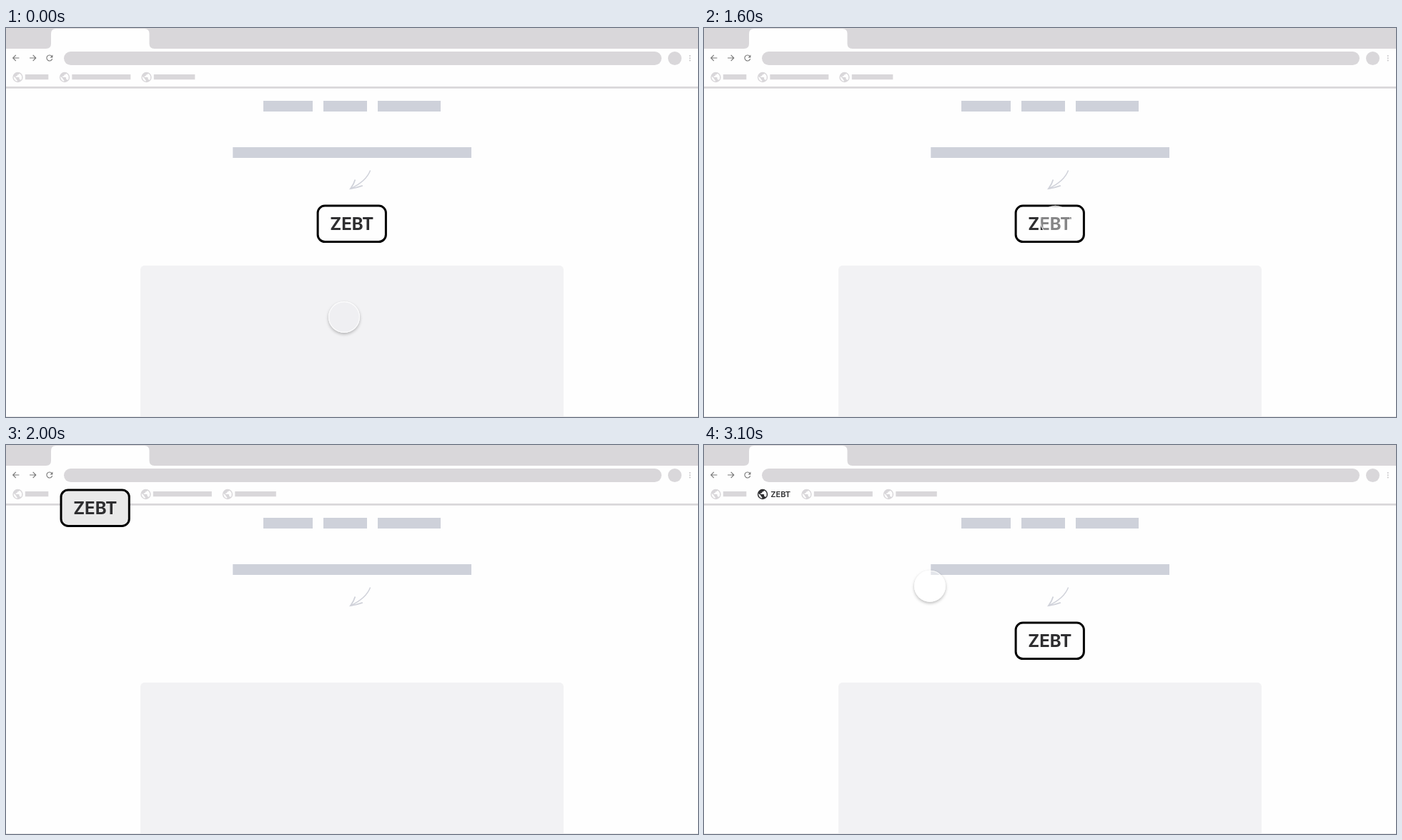
An HTML page with a canvas for the animation above (4.5 s loop, 968x545 px).

```html
<!DOCTYPE html>
<html lang="en">
<head>
<meta charset="utf-8">
<title>Drag to bookmarks</title>
<style>
html, body { margin: 0; width: 100%; height: 100%; overflow: hidden; background: #fefefe; }
canvas { display: block; width: 968px; height: 545px; }
</style>
</head>
<body>
<canvas id="stage" width="968" height="545"></canvas>
<script>
const ctx = document.getElementById('stage').getContext('2d');
const W = 968, H = 545, LOOP = 4500, STEP = 100, LABEL = 'ZEBT';
const PAPER = '#fefefe', CHROME = '#d9d7da', BLOCK = '#ced1da', PANEL = '#f2f2f4';
const INK = '#2e2e30', ICON = '#777', SKETCH = '#d0d2da';
const FONT = 'Inter, Roboto, sans-serif';
const HOME = { x: 436.1, y: 249.1 }, DROP = { x: 77, y: 63 };
const GAP_WIDE = 113.5, GAP_SAVED = 61.5;

// Disc with two land masses cut out, on a 24 unit grid
const globePath = new Path2D('M2 12A10 10 0 1 0 22 12A10 10 0 1 0 2 12Z' +
  'M11 19.9A8 8 0 0 1 4.2 10.2L9 15V16L11 18Z' +
  'M15 4.6A8 8 0 0 1 17.9 17.4L16 16H15V13L14 12H8V10H10L11 9V7H13L15 5Z');

const mix = (a, b, p) => a + (b - a) * p;
const between = (a, b, p) => ({ x: mix(a.x, b.x, p), y: mix(a.y, b.y, p) });
const span = (t, from, to) => Math.min(1, Math.max(0, (t - from) / (to - from)));
const easeIn = (p, power = 2) => p ** power;
const easeOut = p => 1 - (1 - p) ** 2;

function faded(alpha, draw, blend = 'source-over') {
  if (alpha <= 0) return;
  ctx.save();
  ctx.globalAlpha = alpha;
  ctx.globalCompositeOperation = blend;
  draw();
  ctx.restore();
}

function box(x, y, w, h, color, r = 0) {
  ctx.fillStyle = color;
  ctx.beginPath();
  ctx.roundRect(x, y, w, h, r);
  ctx.fill();
}

function dot(x, y, r, color) {
  ctx.fillStyle = color;
  ctx.beginPath();
  ctx.arc(x, y, r, 0, Math.PI * 2);
  ctx.fill();
}

function stroke(path, color, width) {
  ctx.strokeStyle = color;
  ctx.lineWidth = width;
  ctx.stroke(new Path2D(path));
}

function text(x, y, size, weight, align) {
  ctx.font = `${weight} ${size}px ${FONT}`;
  ctx.textAlign = align;
  ctx.fillStyle = INK;
  ctx.fillText(LABEL, x, y);
}

function globe(x, color) {
  ctx.save();
  ctx.translate(x, 69);
  ctx.scale(.72, .72);
  ctx.translate(-12, -12);
  ctx.fillStyle = color;
  ctx.fill(globePath, 'evenodd');
  ctx.restore();
}

function bookmark(x, width) {
  globe(x, CHROME);
  box(x + 10.3, 65, width, 7.3, CHROME);
}

function movingBookmarks(shift) {
  bookmark(82 + shift, 82);
  bookmark(196.5 + shift, 57.5);
}

function navArrow(x, dir) {
  ctx.save();
  ctx.translate(x, 42);
  ctx.scale(dir, 1);
  stroke('M-4.4 0H4.2M.2 -4.2L4.3 0L.2 4.2', ICON, 1.1);
  ctx.restore();
}

function reload() {
  stroke('M64 39.4A4 4 0 1 0 64.7 43.3', ICON, 1.1);
  ctx.fillStyle = ICON;
  ctx.fill(new Path2D('M65.4 37.6V41.4H61.6Z'));
}

function browser() {
  box(0, 0, W, 29, CHROME);
  ctx.fillStyle = PAPER;
  ctx.fill(new Path2D('M56 29Q63 29 63 22V8Q63 1 70 1H193.5Q200.5 1 200.5 8V22Q200.5 29 207.5 29Z'));
  navArrow(14, -1);
  navArrow(37.5, 1);
  reload();
  box(81, 33, 836, 19, CHROME, 9.5);
  dot(935.5, 42.5, 9.5, CHROME);
  for (let i = -1; i <= 1; i++) dot(956.7, 42.3 + i * 3.3, 1, '#c8c6c9');
  bookmark(16.5, 32.5);
  box(0, 82, W, 2.8, CHROME);
}

function page() {
  box(360, 102, 69, 15, BLOCK);
  box(444, 102, 61, 15, BLOCK);
  box(520, 102, 88, 15, BLOCK);
  box(317.3, 167, 333.7, 15, BLOCK);
  stroke('M509.6 199.5Q504 214.5 482.5 224.8', SKETCH, 1.5);
  stroke('M488.4 212.5Q486.5 219 482 225Q490 224 498.8 220.8', SKETCH, 1.8);
  box(188, 332.7, 592, 212, PANEL, [6, 6, 0, 0]);
  box(0, 544, W, 1, '#e9e9eb');
}

function button({ x, y }, shade = 254) {
  box(x, y, 95.3, 50.4, `rgb(${shade},${shade},${shade})`, 10);
  ctx.strokeStyle = '#000';
  ctx.lineWidth = 3;
  ctx.stroke();
  text(x + 47.7, y + 34.3, 24, 700, 'center');
}

function cursorShadow(x, y, r) {
  ctx.save();
  ctx.beginPath();
  ctx.rect(0, 0, W, H);
  ctx.arc(x, y, r, 0, Math.PI * 2);
  ctx.clip('evenodd');
  ctx.shadowColor = 'rgba(0,0,0,.27)';
  ctx.shadowBlur = 4;
  ctx.shadowOffsetY = 2;
  dot(x, y, r, '#fff');
  ctx.restore();
}

function cursor({ x, y }, pressed, lifting) {
  const r = pressed ? 21.5 : 22;
  if (!pressed) cursorShadow(x, y, r);
  dot(x, y, r, lifting ? 'rgba(255,255,255,.42)' : 'rgba(238,238,241,.71)');
  ctx.strokeStyle = 'rgba(255,255,255,.8)';
  ctx.lineWidth = 1.1;
  ctx.beginPath();
  ctx.arc(x, y, r - .6, 0, Math.PI * 2);
  ctx.stroke();
}

const REST = { x: 473, y: 405 }, EDGE = { x: 494, y: 337 }, GRAB = { x: 491.5, y: 270.3 };
const RELEASE = { x: 298, y: 189.5 }, AWAY = { x: 316, y: 197.7 };

function cursorAt(t) {
  if (t >= 2100) return between(RELEASE, AWAY, easeIn(span(t, 2800, 3100), 3));
  if (t >= 500) return between(EDGE, GRAB, easeOut(span(t, 500, 800)));
  return between(REST, EDGE, easeIn(span(t, 100, 400)));
}

function render(t) {
  const drag = easeOut(span(t, 1600, 1978));
  const tint = span(t, 1600, 1800) - span(t, 1900, 2100);
  const saved = easeIn(span(t, 2600, 3100), 1.2);
  const pressed = t >= 1000 && t < 2100;
  const visible = t < 2100 ? 1 - span(t, 1600, 1700) : span(t, 2100, 2500);

  box(0, 0, W, H, PAPER);
  browser();
  page();

  faded(1 - saved, () => {
    movingBookmarks(GAP_WIDE * drag);
    button(between(HOME, DROP, drag), Math.round(mix(254, 211, tint)));
  });
  // Multiply keeps overlapping parts solid while the two states dissolve
  faded(saved, () => {
    movingBookmarks(GAP_SAVED);
    globe(82, INK);
    button(HOME);
    text(93.3, 73, 11, 600, 'left');
  }, saved < 1 ? 'multiply' : 'source-over');

  faded(visible, () => cursor(cursorAt(t), pressed, t >= 1600));
}

const start = performance.now();
function tick() {
  const t = (performance.now() - start) % LOOP;
  render(Math.floor(t / STEP) * STEP);
  requestAnimationFrame(tick);
}
tick();
</script>
</body>
</html>
```
